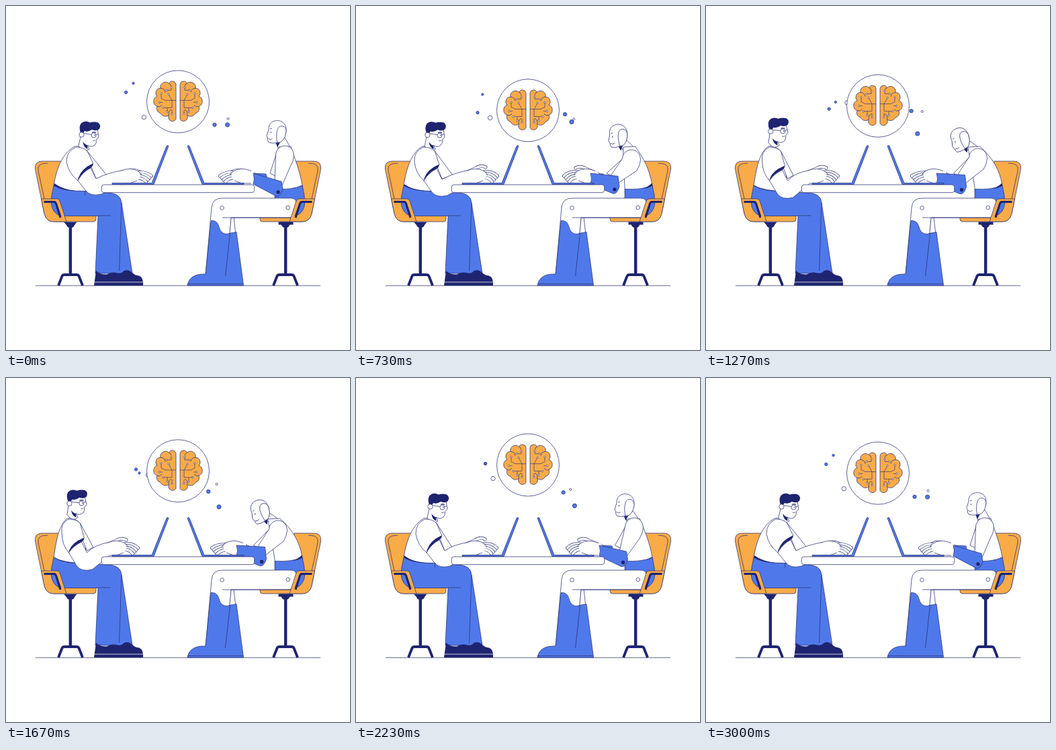
An HTML page for the animation above (3.03 s loop, 512 px wide and 512 px high).

```html
<!DOCTYPE html>
<html lang="en">
<head>
<meta charset="utf-8">
<title>Two at a table</title>
<style>
html, body { margin: 0; width: 100%; height: 100%; overflow: hidden; background: #fff; }
svg { display: block; width: 100%; height: 100%; }
.line { fill: none; }
.blue { fill: #4f79ea; }
.orange { fill: #f9ab48; }
.navy { fill: #1f2470; stroke: none; }
.bar { fill: none; stroke: #1f2470; }
.bare { stroke: none; }
.tip-edge { fill: none; stroke-width: 4.9; stroke-linecap: round; }
.tip { fill: none; stroke: #fff; stroke-width: 3.6; stroke-linecap: round; }
</style>
</head>
<body>
<svg viewBox="0 0 512 512" fill="#fff" stroke="#2b3175" stroke-width=".75" stroke-linejoin="round">
  <defs>
    <g id="chairBack">
      <path class="orange" d="M83 231H54Q42 231 43.500 243L57 309Q60 321 71 321H130Q134 321 134 317V312H88Z"/>
      <path class="line" d="M62 234.300H58Q46.500 235 48 245L57 287"/>
      <path class="navy" d="M86 321.500H105.500L102 326Q101 330 96 330T90 326Z"/>
      <path class="bar" stroke-width="4.400" d="M95.800 328V400"/>
      <path class="bar" stroke-width="3.800" d="M78 416L83.500 402Q84.500 400 87 400H105Q107.500 400 108.500 402L114 416"/>
    </g>
    <g id="chairArm">
      <path class="orange" d="M52.500 287H76Q79 287 80 290L90 321H71Q60 321 57 309Z"/>
      <path class="blue" d="M67 291H74L82 312.500Q68 309 67 291Z"/>
      <path class="bar" stroke-width="3" d="M56.500 291.500H71Q73.500 291.500 74.500 294L81 315"/>
    </g>
    <path id="laptop" class="blue" d="M158 265.500V263.500H217L239 208.500Q240.500 206.500 242 208.500L220 265.500Z"/>
    <g id="lobe">
      <path class="orange" d="M-3-26A5.500 5.500 0 0 0-13.500-27A7.500 7.500 0 0 0-26-20A7 7 0 0 0-31-8A8 8 0 0 0-31 7A7 7 0 0 0-26 17A8 8 0 0 0-13.500 20A6 6 0 0 0-3 26Z"/>
      <path class="line" d="M-26-20Q-20-20-19-14M-31 7Q-27 9-24 5M-13.500 20Q-15 14-10 12M-13.500-27Q-11-27-10-23"/>
    </g>
    <g id="circuit" stroke-width=".65">
      <path class="line" d="M-3-2H-9L-14-11M-10-21V-17L-17-17M-25-12V-5L-19-2H-9M-28 1H-23M-22 9H-9V-2M-16 9V15M-9 18V12"/>
      <circle cx="-14" cy="-11" r="1.200"/><circle cx="-10" cy="-21" r="1.200"/>
      <circle cx="-17" cy="-17" r="1.200"/><circle cx="-25" cy="-12" r="1.200"/>
      <circle cx="-28" cy="1" r="1.200"/><circle cx="-22" cy="9" r="1.200"/>
      <circle cx="-16" cy="15" r="1.200"/><circle cx="-9" cy="18" r="1.200"/>
    </g>
  </defs>

  <path class="line" d="M44 416.200H468"/>
  <use href="#chairBack"/>
  <use href="#chairBack" transform="matrix(-1 0 0 1 512 0)"/>
  <path class="navy" d="M405.500 321.500H427.500V325.500H405.500Z"/>

  <g id="dots"></g>
  <g id="bubble">
    <circle r="46.500"/>
    <use href="#lobe"/><use href="#lobe" transform="scale(-1 1)"/>
    <g id="wires"><use href="#circuit"/><use href="#circuit" transform="scale(-1 1)"/></g>
  </g>

  <!-- man -->
  <path id="manTorso"/>
  <g id="manHead">
    <path d="M112 190L108 208Q115 220 124 213L121 207Q127 211 132 207Q135 204 134.500 199L138 195L136 183H116Z"/>
    <path class="navy" d="M114.500 202Q117 206 121 207.500L121.500 213Q115 210 114.500 202Z"/>
    <path class="navy" d="M111 189Q108 180 111.500 175Q117 169.500 125 173.500Q131 171.500 137 173.500Q142 177 139 183Q135 187 128 184Q122 188 117 186L114.500 190Z"/>
    <circle cx="112.500" cy="191.500" r="3.700"/>
    <circle class="line" cx="130.500" cy="192.500" r="3.500"/>
    <path class="line" d="M116 189.500L127 191.500M134 192Q135 190.500 137 191M129 200Q131 201 133 200"/>
    <path class="line" stroke-width="1.200" d="M128 188.300Q131 187 134 188.500"/>
    <circle class="navy" cx="132" cy="192.300" r=".8"/>
  </g>
  <path class="blue" d="M71 267Q84 276 118 275.500L150 278Q171 278 172 293L188 398H133L137 312.500H88Q64 307 68 282Z"/>
  <path class="line" d="M137 312H156M172 293L168.500 394M117.500 275V282"/>
  <path id="manHem" class="navy"/>
  <path class="navy" d="M131 416L134 394Q140 400 150 399.500Q158 395 165 397.500Q172 399 175 394.500Q182 391 188 397Q192 401 198 401.500Q205 404 204 416Z"/>
  <path d="M131 411H204" stroke="#fff"/>
  <use href="#chairArm"/>

  <!-- robot -->
  <path id="botNeck"/>
  <g id="botHead">
    <path class="navy" d="M401 202.500L409 201L404 210Z"/>
    <path d="M391 184C390 166 417 166 417 184C417 193 412 202 404 203.500Q396 205 391 203Q389 200 389.500 197L388 193Z"/>
    <path d="M403.500 203C402 193 402 179 410 178.500Q417 179 417 187Q416 196 411 201Q408 204 403.500 203Z"/>
    <path class="line" d="M390.500 197Q393 200 396.500 197.500M393 183L396 182"/>
    <circle class="navy" cx="394.500" cy="188" r=".8"/>
  </g>
  <path id="botTorso"/>
  <path class="blue" d="M400.500 272.500Q425 274 441 267L444 282Q447 306 430 311L401 292Z"/>
  <path id="botHem" class="navy"/>
  <path d="M335 314L326 400L340 414H350L339 314Z"/>
  <path d="M424 286H322Q307 286 306 300L297 400H327L335 315H424Q432 315 432 307V293Q432 286 424 286Z"/>
  <path class="blue" d="M305 319.500C316 319 316 327 319 334Q324 342 334 338L343 336.500L353.500 416H270Q273 398 297 399Z"/>
  <path class="line" d="M333.500 338L326.500 402M270 413.500H353M322 315H424"/>
  <circle cx="321.500" cy="300.500" r="2.800"/><circle cx="419.700" cy="300" r="2.800"/>
  <use href="#chairArm" transform="matrix(-1 0 0 1 512 0)"/>

  <!-- arms -->
  <path id="manFar"/>
  <path id="manSleeve"/>
  <path id="manCuff" class="navy"/>
  <g id="manHand"></g>
  <path id="manArm"/>
  <path id="botFar"/>
  <path id="botFarCuff" class="blue"/>
  <path id="botUpper"/>
  <g id="botHand"></g>
  <path id="botSleeve" class="blue"/>
  <circle id="botButton" class="navy" r="2.700"/>

  <rect x="142.300" y="266" width="227.400" height="11.700" rx="3.500"/>
  <use href="#laptop"/>
  <use href="#laptop" transform="matrix(-1 0 0 1 512 0)"/>
</svg>
<script>
const LOOP = 3030;
const KEYS = [0, 330, 730, 1270, 1670, 2230];
const $ = id => document.getElementById(id);
const set = (id, name, value) => $(id).setAttribute(name, value);
const path = (id, d) => set(id, 'd', d);
const clamp = v => Math.max(0, Math.min(1, v));

// Periodic monotone cubic through one value per key time.
function track(...values) {
  const n = KEYS.length;
  const at = i => values[(i + n) % n];
  const time = i => KEYS[(i + n) % n] + LOOP * Math.floor(i / n);
  const slope = i => (at(i + 1) - at(i)) / (time(i + 1) - time(i));
  const tangent = i => {
    const a = slope(i - 1), b = slope(i);
    return a * b <= 0 ? 0 : 2 * a * b / (a + b);
  };
  return t => {
    let i = n - 1;
    while (KEYS[i] > t) i--;
    const span = time(i + 1) - time(i), u = (t - time(i)) / span, v = 1 - u;
    return at(i) * v * v * (1 + 2 * u) + at(i + 1) * u * u * (3 - 2 * u)
      + span * u * v * (tangent(i) * v - tangent(i + 1) * u);
  };
}

const man = {
  headX: track(0, 2.5, -6, -16, -18, -2),
  headY: track(0, 1, .3, -5.5, -5.5, 0),
  tilt: track(0, 0, -1, -4, -4, 0),
  armX: track(0, 1, -6, -12.5, -13.5, -2),
  drop: track(0, 1, 2, 5, 5, 0),
  handX: track(0, -1, -6, -20, -20, -7),
  lift: track(0, -3, -7, -6, -6, -7)
};
const bot = {
  headX: track(0, 3, -13, -25, -25, -3),
  headY: track(0, 1, 5.5, 10.5, 10.5, 2),
  tilt: track(0, 0, -8, -25, -25, -1),
  shoulderX: track(415, 416, 410, 405, 405, 414),
  shoulderY: track(221, 222, 227, 225, 225, 221),
  elbowX: track(405, 402, 385, 380.5, 380.5, 397.5),
  elbowY: track(277, 276, 273, 273.5, 273.5, 274.5),
  wristX: track(368, 364, 349, 343, 343, 362),
  handX: track(0, -2, -9, -12, -12, -4),
  lift: track(0, -2, -6, 2, 2, -6)
};
const pose = (figure, t) =>
  Object.fromEntries(Object.entries(figure).map(([key, f]) => [key, f(t)]));

const dots = [
  [2.2, true, track(178.6, 178, 181, 183.2, 193.5, 192.5), track(128.5, 142.5, 158.7, 153.2, 136, 127.5)],
  [1.7, true, track(189.5, 188.8, 188.3, 192.8, 198.5, 192.7), track(115, 118, 131.6, 143, 141.5, 127.4)],
  [3.2, false, track(205.3, 206, 199.6, 210, 211.5, 204), track(165.5, 176, 166.5, 144, 144.5, 149.6)],
  [2.7, true, track(310.5, 310.5, 311, 305.6, 301.2, 308.6), track(176.8, 169.6, 161.2, 156.3, 169, 170.3)],
  [3.1, true, track(329.6, 323.2, 321, 314.8, 317, 325.4), track(176.8, 174.5, 172.5, 190, 191.8, 190.2)],
  [1.6, false, track(330.5, 326.3, 324.3, 321.6, 313.6, 319.2), track(167.8, 175, 168.4, 157, 158, 165.8)]
].map(([r, filled, x, y]) => {
  const el = document.createElementNS('http://www.w3.org/2000/svg', 'circle');
  el.setAttribute('r', r);
  if (filled) el.setAttribute('class', 'blue');
  $('dots').append(el);
  return { el, x, y };
});

const finger = d => `<path class="tip-edge" d="${d}"/><path class="tip" d="${d}"/>`;

function hand(lift) {
  let out = finger(`M166 250L184 ${245 + lift * .5}Q192 ${243 + lift} 199 ${247 + lift}`);
  for (let i = 0; i < 4; i++) {
    out += finger(`M190 ${249 + i * 2}Q${206 - i} ${245 + i * 3.4 + lift * .3} ${216.5 - i * 2.6} ${253 + i * 2.9}`);
  }
  return out + '<path class="bare" d="M166 247Q186 239 197 246Q202 254 195 260L184 264H166Z"/>' +
    '<path class="line" d="M170 245.500Q186 239 197 246Q201 249 202 252M195 260L184 264H170"/>';
}

function drawMan(p) {
  const { headX, armX: a, handX: h, drop } = p, n = headX * .6;
  set('manHead', 'transform', `translate(${headX} ${p.headY}) rotate(${p.tilt} 122 195)`);
  path('manTorso', `M71 267C75 243 ${83 + n * .5} 220 ${102 + n} 209Q${112 + n} 207 ${121 + n} 216L${132 + a} 240L${132 + a} 272L118 276Q88 276 71 267Z`);
  const hem = 3 * clamp(1 + headX / 14);
  path('manHem', `M71 267L72 ${267 - hem}Q84 ${276 - hem} 104 275.500Q82 274.500 71 267Z`);
  path('manFar', `M${121 + n} 216L${150 + h} 252L${134 + a} 257L${124 + a} 232Z`);
  path('manSleeve', `M${90 + a * .5} 232Q${93 + a * .7} 249 ${107 + a} 260L${130 + a} ${235 + drop * .7}L${121 + n} 216Q${115 + n} 210 ${104 + n} 210Q${90 + a * .7} 216 ${90 + a * .5} 232`);
  path('manCuff', `M${106.5 + a} 260Q${110 + a} ${243 + drop * .5} ${129 + a} ${234.5 + drop * .7}Q${131 + a} ${237 + drop * .7} ${126 + a} ${241 + drop * .6}Q${114 + a} ${247 + drop * .5} ${106.5 + a} 260Z`);
  set('manHand', 'transform', `translate(${h} 0)`);
  $('manHand').innerHTML = hand(p.lift);
  path('manArm', `M${174 + h} 244.500Q${152 + h} 248 ${134 + a} ${257 + drop * .6}L${126 + a} ${241 + drop * .6}Q${114 + a} ${247 + drop * .5} ${107 + a} 260L${119 + a} ${275 + drop}Q${126 + a} ${284 + drop} ${142 + a} ${280 + drop}L${174 + h} 264.500`);
}

function drawBot(p) {
  const { shoulderX: sx, shoulderY: sy, elbowX: ex, elbowY: ey, wristX: w } = p;
  const n = 420 + p.headX * .65, angle = p.tilt * Math.PI / 180;
  const cos = Math.cos(angle), sin = Math.sin(angle);
  const onHead = (x, y) =>
    `${404 + p.headX + x * cos - y * sin} ${187 + p.headY + x * sin + y * cos}`;
  set('botHead', 'transform', `translate(${p.headX} ${p.headY}) rotate(${p.tilt} 404 187)`);
  path('botNeck', `M${onHead(0, 15)}L${n - 15} 214L${n + 4} 212L${onHead(11, 9)}Z`);
  path('botTorso', `M${n - 14} 210L${sx - 12} ${sy + 2}L400 270V286H443L441 267C437 243 ${429 + p.headX * .1} 226 ${n + 4} 209Z`);
  const hem = clamp(-p.headX / 12);
  path('botHem', `M426 272Q434 ${272 - 2 * hem} 440.500 ${267 - 3.5 * hem}L441.200 267.500Q434 271.500 426 272Z`);
  path('botFar', `M${sx - 13} ${sy}L${ex - 12} 249L${ex + 2} 256Z`);
  path('botFarCuff', `M${w} 249L${w + 19} 250L${w + 22} 263L${w} 262Z`);
  const elbowTop = 251.5 + (ex - 380.5) * .4;
  path('botUpper', `M${ex - 5} ${elbowTop - 2}L${sx - 13.5} ${sy}C${sx - 12} ${sy - 17} ${sx + 13} ${sy - 18} ${sx + 13.5} ${sy + 2}Q${sx + 13} ${sy + 10} ${sx + 8} ${sy + 18}L${ex + 6} ${ey - 10}Z`);
  set('botHand', 'transform', `matrix(-1 0 0 1 ${535 + p.handX} 0)`);
  $('botHand').innerHTML = hand(p.lift);
  path('botSleeve', `M${w} 249L${ex + 5} ${elbowTop}L${ex + 7} ${ey - 4}Q${ex + 3} ${ey + 8} ${ex - 3} ${ey + 6}L${w} 265Q${w + 3} 257 ${w} 249Z`);
  set('botButton', 'cx', ex);
  set('botButton', 'cy', ey);
}

function draw(t) {
  const phase = 2 * Math.PI * t / LOOP;
  set('bubble', 'transform', `translate(256 ${142.4 + 13 * Math.sin(phase)})`);
  set('wires', 'transform', `translate(0 ${1.2 * Math.sin(phase * 2)})`);
  for (const { el, x, y } of dots) {
    el.setAttribute('cx', x(t));
    el.setAttribute('cy', y(t));
  }
  drawMan(pose(man, t));
  drawBot(pose(bot, t));
}

function tick() {
  draw(performance.now() % LOOP);
  requestAnimationFrame(tick);
}
tick();
</script>
</body>
</html>
```
